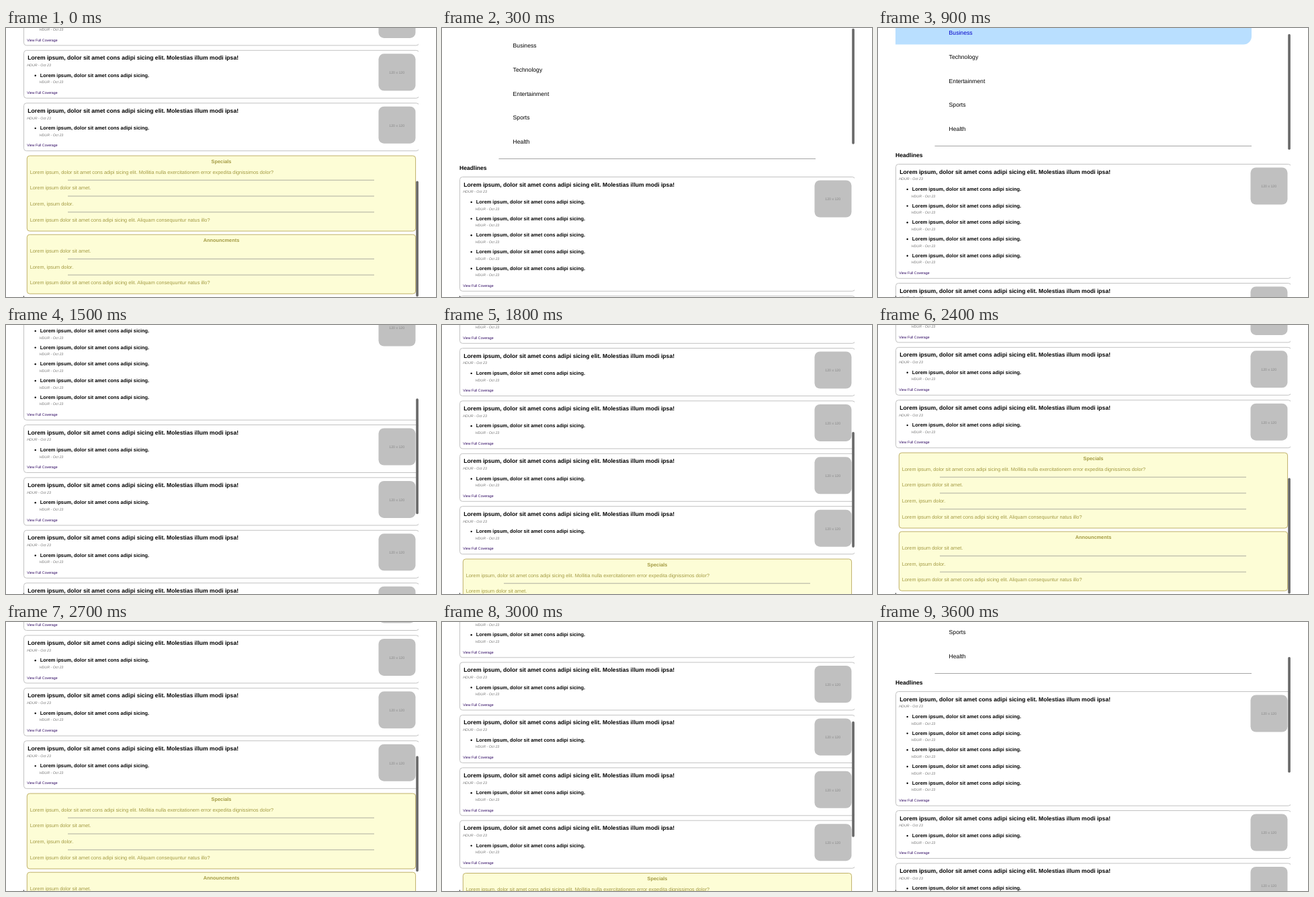
Write an HTML page that moves like this. It is 640 by 400 pixels and loops after 3.9 s.

```html
<!DOCTYPE html>
<html lang="en">
<head>
<meta charset="utf-8">
<title>News page scrolling</title>
<style>
  html, body { margin: 0; width: 100%; height: 100%; overflow: hidden; background: #fff; }
  svg { display: block; font-family: "Liberation Sans", Arial, sans-serif; white-space: pre; text-rendering: geometricPrecision; }
  .bold { font-weight: bold; }
  .pub { font-size: 5.3px; font-style: italic; fill: #777; }
  .title { font-size: 8.61px; }
  .story { font-size: 7.37px; }
  .link { font-size: 5.25px; fill: #2c0560; }
  .nav { font-size: 8.65px; }
  .notice { font-size: 7.35px; fill: #a39a42; }
  .thumb { font-size: 5.2px; fill: #888; }
  .mid { text-anchor: middle; }
</style>
</head>
<body>
<svg width="640" height="400" viewBox="0 0 640 400">
  <clipPath id="view"><rect x="26" width="588" height="400"/></clipPath>
  <g clip-path="url(#view)">
    <g id="page"></g>
    <rect id="bar" x="610.2" width="3.7" height="172" rx="1.8" fill="#6a6a6a"/>
    <rect x="26" y="398.5" width="1" height="1.5" fill="#222"/>
  </g>
</svg>
<script>
const page = document.getElementById('page');
const bar = document.getElementById('bar');

function add(tag, attrs, text = '') {
  const el = document.createElementNS('http://www.w3.org/2000/svg', tag);
  for (const key in attrs) el.setAttribute(key, attrs[key]);
  el.textContent = text;
  page.appendChild(el);
  return el;
}
const write = (text, x, y, cls) => add('text', { x, y, class: cls }, text);
const box = (x, y, width, height, rx, fill, stroke = 'none') =>
  add('rect', { x, y, width, height, rx, fill, stroke });
const rule = (x1, x2, y, stroke) => add('path', { d: `M${x1} ${y}H${x2}`, stroke });

const LEAD = 'Lorem ipsum, dolor sit amet cons adipi sicing';
const BYLINE = 'HDUR - Oct 23';

function card(top, stories) {
  const pitch = 24.7, extra = (stories - 1) * pitch;
  box(26.5, top, 588.3, 71 + extra, 4, '#fff', '#c2c2c2');
  write(LEAD + ' elit. Molestias illum modi ipsa!', 32.3, top + 14, 'title bold');
  write(BYLINE, 31.3, top + 23.8, 'pub');
  for (let i = 0; i < stories; i++) {
    const y = top + i * pitch;
    add('circle', { cx: 43.7, cy: y + 37.4, r: 1.2 });
    write(LEAD + '.', 50.8, y + 39.5, 'story bold');
    write(BYLINE, 49.7, y + 49, 'pub');
  }
  write('View Full Coverage', 31.2, top + 64.7 + extra, 'link');
  box(554.5, top + 5, 55, 55, 8, '#c0c0c0');
  write('120 x 120', 581.7, top + 34.9, 'thumb mid');
}

function panel(top, height, heading, lines) {
  box(31.3, top, 578.3, height, 4, '#fdfdd6', '#bfb068');
  write(heading, 320.5, top + 10.9, 'notice bold mid');
  lines.forEach((line, i) => {
    const y = top + i * 23.8;
    write(line, 35.7, y + 26.5, 'notice');
    if (i < lines.length - 1) rule(92, 548, y + 36.2, '#adada0');
  });
}

// Navigation
const highlight = add('path', { d: 'M26-11.2H544a12 12 0 0 1 12 12V12.5a12 12 0 0 1-12 12H26z', fill: '#b9dfff' });
const [business] = ['Business', 'Technology', 'Entertainment', 'Sports', 'Health']
  .map((name, i) => write(name, 105.6, 10.1 + i * 35.7, 'nav'));
rule(84.5, 556, 175.5, '#a5a5a5');

// Stories
write('Headlines', 26, 192.3, 'title bold');
card(202.5, 5);
for (let i = 0; i < 4; i++) card(379.5 + i * 78.4, 1);

// Notices
const shared = [
  'Lorem ipsum dolor sit amet.',
  'Lorem, ipsum dolor.',
  'Lorem ipsum dolor sit amet cons adipi sicing elit. Aliquam consequuntur natus illo?'
];
panel(693, 112, 'Specials',
  [LEAD + ' elit. Mollitia nulla exercitationem error expedita dignissimos dolor?', ...shared]);
panel(810.2, 88, 'Announcments', shared);

// Scroll position of each 300 ms step
const STEP = 300;
const scroll = [503, -19, -19, 0, 115, 231, 345, 458, 503, 438, 319.5, 210, 99];

function draw(now) {
  const step = Math.floor(now / STEP) % scroll.length;
  const y = scroll[step], hover = step !== 1;
  page.setAttribute('transform', `translate(0 ${-y})`);
  bar.setAttribute('y', 9 + y * 0.4345);
  highlight.setAttribute('visibility', hover ? 'visible' : 'hidden');
  business.setAttribute('fill', hover ? '#0000c8' : '#000');
}

const start = performance.now();
function tick() {
  draw(performance.now() - start);
  requestAnimationFrame(tick);
}
tick();
</script>
</body>
</html>
```
